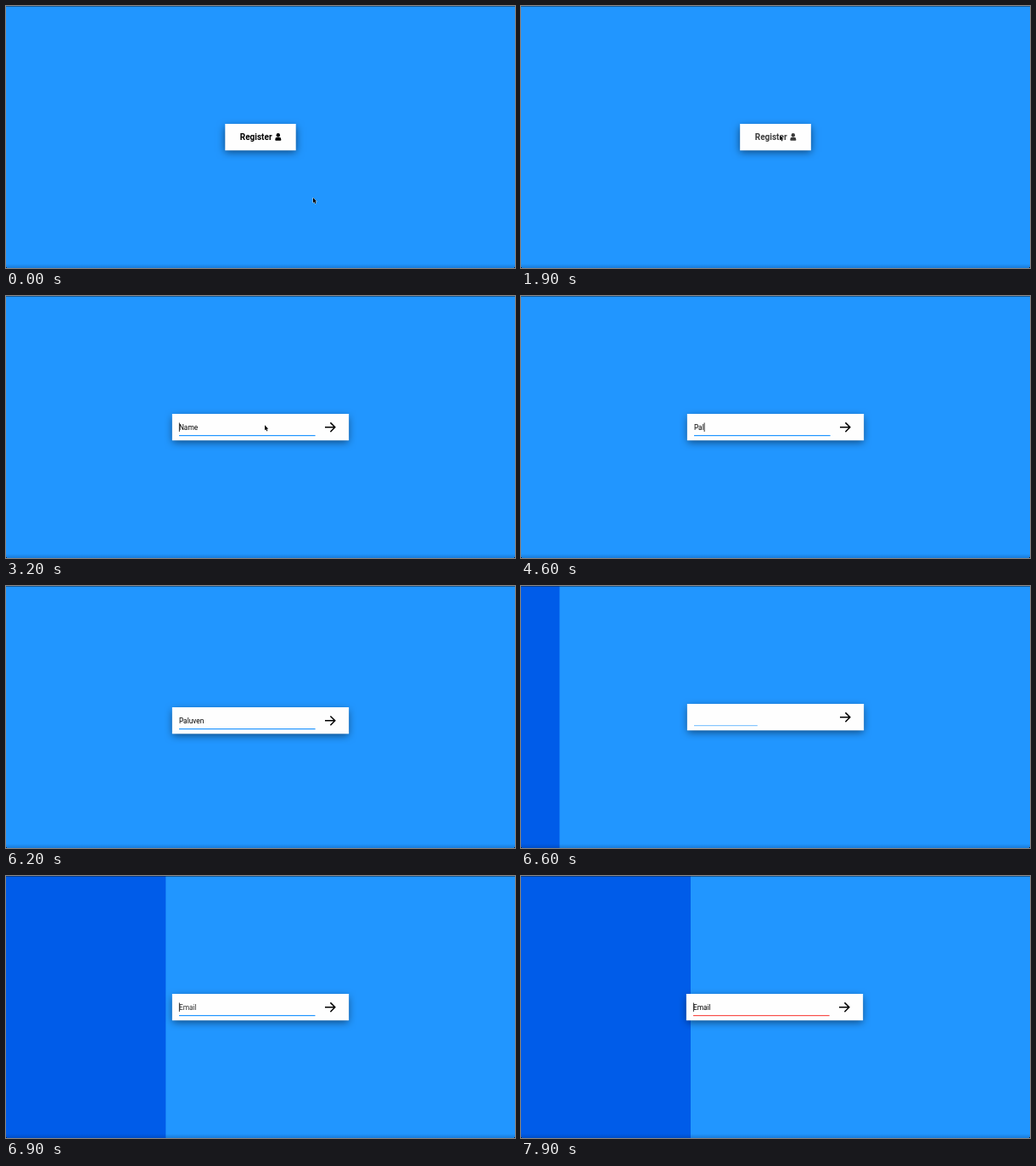
An HTML page with a canvas for the animation above (8000 ms loop, 600 px wide and 309 px high).

```html
<!DOCTYPE html>
<html lang="en">
<head>
<meta charset="utf-8">
<title>Register form</title>
<style>
html, body { margin: 0; height: 100%; overflow: hidden; background: #2196ff; }
canvas { display: block; }
</style>
</head>
<body>
<canvas id="stage" width="600" height="309"></canvas>
<script>
const ctx = document.getElementById('stage').getContext('2d');
const LOOP = 8000, STEP = 100;
const BLUE = '#2196ff', DARK = '#005ce9', RED = '#f8504a';
const NAME = 'Paluven';
const KEYS = [4200, 4500, 4600, 5000, 5200, 5300, 5500];
const SHAKE = 7375;

// cubic-bezier(.42, 0, .58, 1), solved by bisection
function ease(x) {
  if (x <= 0) return 0;
  if (x >= 1) return 1;
  let lo = 0, hi = 1, u;
  for (let i = 0; i < 20; i++) {
    u = (lo + hi) / 2;
    const bx = 3 * (1 - u) * u * ((1 - u) * .42 + u * .58) + u ** 3;
    if (bx < x) lo = u; else hi = u;
  }
  return u * u * (3 - 2 * u);
}
const tween = (t, start, length) => ease((t - start) / length);
const mix = (a, b, k) => a + (b - a) * k;

function rect(color, x, y, w, h, alpha = 1) {
  ctx.globalAlpha = alpha;
  ctx.fillStyle = color;
  ctx.fillRect(x, y, w, h);
  ctx.globalAlpha = 1;
}

function text(string, x, y, font, alpha = 1) {
  ctx.globalAlpha = alpha;
  ctx.fillStyle = '#000';
  ctx.font = font + ' Roboto, sans-serif';
  ctx.fillText(string, x, y);
  ctx.globalAlpha = 1;
}

function backdrop(t) {
  rect(BLUE, 0, 0, 600, 309);
  rect(DARK, 0, 0, 200 * tween(t, 6402, 600), 309);
  rect('#123', 0, 0, 600, 1, .5);
  const shade = ctx.createLinearGradient(0, 304, 0, 309);
  shade.addColorStop(0, 'rgba(0,30,80,0)');
  shade.addColorStop(1, 'rgba(0,30,80,.22)');
  rect(shade, 0, 304, 600, 5);
  rect('#123', 0, 308, 1, 1);
  rect('#123', 599, 308, 1, 1);
}

function card(width) {
  ctx.save();
  ctx.shadowColor = 'rgba(0,0,0,.5)';
  ctx.shadowBlur = 9;
  ctx.shadowOffsetY = 2.5;
  rect('#fefefe', 300 - width / 2, 139, width, 31.3);
  ctx.restore();
}

function registerLabel(alpha) {
  text('Register', 275.8, 158.3, 'bold 10px', alpha);
  ctx.globalAlpha = alpha;
  ctx.beginPath();
  ctx.arc(320.8, 152.3, 2.2, 0, 7);
  ctx.fill();
  ctx.beginPath();
  ctx.roundRect(317.3, 154.8, 7, 4, [2.4, 2.4, .8, .8]);
  ctx.fill();
  ctx.globalAlpha = 1;
}

function arrow(alpha) {
  ctx.globalAlpha = alpha;
  ctx.strokeStyle = '#000';
  ctx.lineWidth = 1.5;
  ctx.stroke(new Path2D('M376 154.8H387.6M382.4 149.4L387.8 154.8L382.4 160.2'));
  ctx.globalAlpha = 1;
}

// Blinks every half second, restarting at each key press
function caret(t, x, since) {
  if (t >= since && Math.floor((t - since) / 500) % 2 === 0)
    rect('#222', x, 149.5, .9, 10.5);
}

function field(t) {
  const second = t >= 6450;
  const typed = second ? '' : NAME.slice(0, KEYS.filter(k => k <= t).length);
  const shown = typed || (second ? 'Email' : 'Name');
  const hidden = tween(t, 6300, 150);
  const alpha = second ? tween(t, 6600, 420) : tween(t, 2780, 300) * (1 - hidden);
  text(shown, 203.9, 158, '8.35px', alpha);

  const renewed = t >= 6312;
  const grown = renewed ? tween(t, 6312, 600) : tween(t, 2700, 500);
  const lineAlpha = renewed ? mix(.3, 1, tween(t, 6480, 300)) : 1;
  rect(t >= SHAKE ? RED : BLUE, 204, 164, 160.6 * grown, 1.2, lineAlpha);

  if (second) caret(t, 203.9, 6900);
  else if (t < 6200) {
    const last = KEYS.filter(k => k <= t).pop() || 3100;
    const x = 203.9 + (typed ? ctx.measureText(typed).width : 0);
    caret(t, x, last);
  }
  arrow(tween(t, 2750, 300));
}

function nudge(t) {
  const dip = 4.1 * (tween(t, 6110, 100) - tween(t, 6210, 100));
  let shift = 0;
  if (t >= SHAKE) {
    const i = Math.floor((t - SHAKE) / 100);
    const aim = n => n < 0 || n > 5 ? 0 : n % 2 ? 2.6 : -2.6;
    shift = mix(aim(i - 1), aim(i), tween(t, SHAKE + i * 100, 65));
  }
  ctx.translate(shift, dip);
}

function pointer(t) {
  if (t >= KEYS[0]) return;
  const k = tween(t, 50, 650);
  ctx.save();
  ctx.translate(mix(362, 305, k), mix(226, 152.3, k));
  const shape = new Path2D('M0 0V6L1.4 4.9L2.4 7.2L3.4 6.8L2.4 4.5H4.2Z');
  ctx.strokeStyle = 'rgba(255,255,255,.8)';
  ctx.lineWidth = .9;
  ctx.stroke(shape);
  ctx.fillStyle = '#000';
  ctx.fill(shape);
  ctx.restore();
}

function draw(now) {
  const t = Math.floor(now % LOOP / STEP) * STEP;
  backdrop(t);
  ctx.save();
  nudge(t);
  card(mix(83.4, 208.3, tween(t, 1880, 600)));
  if (t < 2100) registerLabel(1 - tween(t, 1850, 150));
  if (t >= 2700) field(t);
  ctx.restore();
  pointer(t);
}

const start = performance.now();
function tick() {
  draw(performance.now() - start);
  requestAnimationFrame(tick);
}
tick();
</script>
</body>
</html>
```
